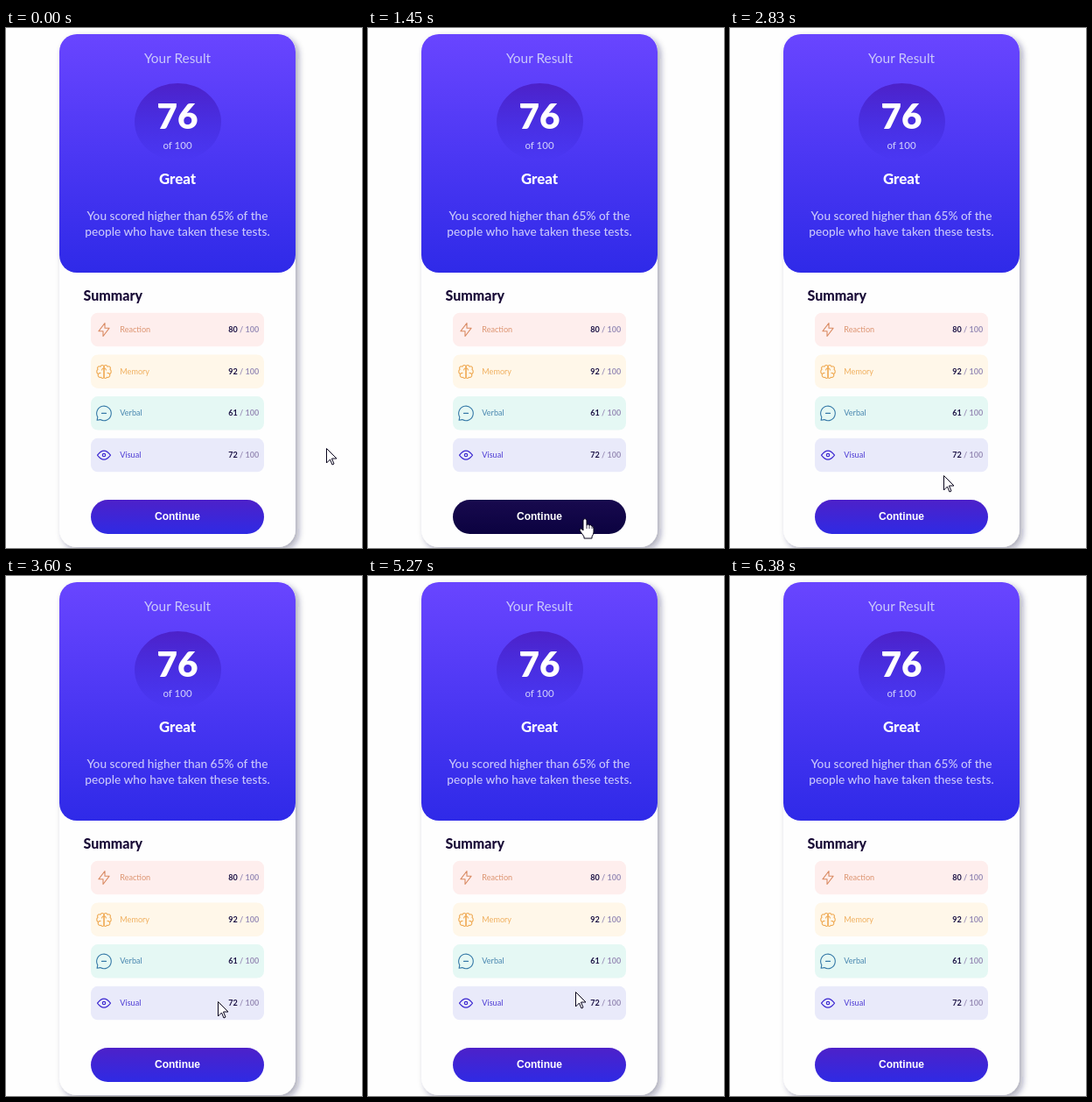
An HTML page that plays this animation: 407x593 px, repeating every 6.87 s.

```html
<!DOCTYPE html>
<html lang="en">
<head>
<meta charset="utf-8">
<title>Result summary</title>
<style>
  html, body { margin: 0; width: 100%; height: 100%; overflow: hidden; background: #fefefe; }
  svg { display: block; width: 407px; height: 593px; }
  text { font-family: Lato, "Open Sans", sans-serif; }
  .mid { text-anchor: middle; }
  .soft { fill: #cac8fb; }
  .medium { font-weight: 500; }
  .bold { font-weight: 700; }
  .heavy { font-weight: 800; }
  .icon { fill: none; stroke-width: 1.1; stroke-linecap: round; stroke-linejoin: round; }
  .pointer { fill: #fff; stroke: #08041c; stroke-linejoin: round; }
</style>
</head>
<body>
<svg viewBox="0 0 407 593">
  <defs>
    <linearGradient id="header" x2="0" y2="1">
      <stop stop-color="#6945ff"/><stop offset="1" stop-color="#2f2ae8"/>
    </linearGradient>
    <linearGradient id="disc" x2="0" y2="1">
      <stop stop-color="#4d21c9"/><stop offset="1" stop-color="#2f22d0" stop-opacity="0"/>
    </linearGradient>
    <linearGradient id="idle" x2="0" y2="1">
      <stop stop-color="#4d21c9"/><stop offset="1" stop-color="#2f2ae4"/>
    </linearGradient>
    <linearGradient id="hover" x2="0" y2="1">
      <stop stop-color="#180a4e"/><stop offset="1" stop-color="#0b0240"/>
    </linearGradient>
    <filter id="shadow" x="-10%" y="-10%" width="120%" height="120%">
      <feDropShadow dx="3.5" dy="3.5" stdDeviation="3.5" flood-color="#1c1a48" flood-opacity=".37"/>
    </filter>
  </defs>

  <rect x="61" y="7" width="270" height="585" rx="20" fill="#fefefe" filter="url(#shadow)"/>
  <rect x="61" y="7" width="270" height="272" rx="20" fill="url(#header)"/>
  <text class="mid soft" x="196" y="40" font-size="15.4">Your Result</text>
  <ellipse cx="196.5" cy="107" rx="49.5" ry="44" fill="url(#disc)"/>
  <text class="mid" x="196" y="114.5" font-size="40.5" font-weight="900" fill="#fff">76</text>
  <text class="mid soft medium" x="196" y="138" font-size="11.5">of 100</text>
  <text class="mid heavy" x="196" y="178" font-size="16.9" fill="#fff">Great</text>
  <text class="mid soft medium" x="196" y="219" font-size="13.7">You scored higher than 65% of the</text>
  <text class="mid soft medium" x="196" y="237" font-size="13.7">people who have taken these tests.</text>

  <text class="heavy" x="88.5" y="311" font-size="16" fill="#180a36">Summary</text>
  <g id="rows"></g>

  <rect id="button" x="97" y="538" width="198" height="39" rx="19.5"/>
  <text class="mid bold" x="196" y="561" font-size="12" fill="#fff"
    style="font-family: 'Liberation Sans', Arial, sans-serif">Continue</text>

  <g id="cursor">
    <path id="arrow" class="pointer" d="M.5 .5V17L4.5 13 7 19 9 18 6.5 12H12Z"/>
    <g id="hand">
      <path class="pointer" d="M-2 2Q0-1 2 2V8Q4 6 5 8 7 7 8 9 10 9 10 12V16Q10 18 8 21V23H-1V21L-6 14Q-6 11-4 12L-2 14Z"/>
      <path d="M2 8V12M5 8V12M8 9V12" stroke="#08041c" stroke-width=".8"/>
    </g>
  </g>
</svg>
<script>
const LOOP = 6870;
const byId = id => document.getElementById(id);

// Icons are drawn around their own centre.
const brainHalf = "M0-6A2.1 2.1 0 0 0-4-5.4 2.1 2.1 0 0 0-7-2.5 3.3 3.3 0 0 0-6.5 3" +
  "A2.5 2.5 0 0 0-3.3 6.5 1.7 1.7 0 0 0 0 6.5V-6M-6.5 3Q-6 1.7-4 1.7M0-4Q2-4 2.5-1.7";
const icons = {
  bolt: `<path d="M1-1.7V-7.5L-6 1.7H-1V7.5L6-1.7Z"/>`,
  brain: `<path d="${brainHalf}"/><path transform="scale(-1 1)" d="${brainHalf}"/>`,
  bubble: `<path d="M-7.2 4.2A8.3 8.3 0 1 1-4.2 7.2L-7.9 7.9ZM-2.5 0H2.5"/>`,
  eye: `<path d="M-7.5 0Q0-10 7.5 0 0 10-7.5 0Z"/><circle r="1.7"/>`
};

const rows = [
  { label: "Reaction", score: 80, icon: "bolt", fill: "#feeeed", ink: "#d98a62" },
  { label: "Memory", score: 92, icon: "brain", fill: "#fff7e9", ink: "#efa850" },
  { label: "Verbal", score: 61, icon: "bubble", fill: "#e5f8f4", ink: "#377aa8" },
  { label: "Visual", score: 72, icon: "eye", fill: "#e9eafa", ink: "#3a26d0" }
];

byId("rows").innerHTML = rows.map((row, i) => `
  <g transform="translate(97 ${324.7 + i * 47.7})" font-size="9.1">
    <rect width="198" height="38.5" rx="8" fill="${row.fill}"/>
    <g class="icon" transform="translate(15 19.3)" stroke="${row.ink}">${icons[row.icon]}</g>
    <text x="33.3" y="22.4" fill="${row.ink}" opacity=".9">${row.label}</text>
    <text class="bold" x="192.3" y="22.4" text-anchor="end" fill="#9a8fb8"><tspan
      fill="#1d1446">${row.score}</tspan> / 100</text>
  </g>`).join("");

const progress = (t, from, to) => Math.min(1, Math.max(0, (t - from) / (to - from)));
const mix = (a, b, u) => a + (b - a) * u;

// The pointer glides in, leaves the button upwards three times, then glides out.
const LIFT = 88;
const lifts = [[1785, 2945], [3400, 4200], [4440, 5800]];

function pointerAt(t) {
  const enter = progress(t, 410, 900);
  const leave = progress(t, 5840, 6370);
  const lifted = lifts.reduce((sum, [from, to]) =>
    sum + LIFT * Math.sqrt(Math.abs(Math.sin(Math.PI * progress(t, from, to)))), 0);
  const x = mix(250, 237, progress(t, 900, 5270));
  const y = 559 - lifted;
  return {
    x: mix(mix(366, x, enter), 371, leave),
    y: mix(mix(479, y, enter), 594, leave),
    gone: leave === 1
  };
}

const show = (id, on) => byId(id).setAttribute("display", on ? "inline" : "none");

function draw(t) {
  const { x, y, gone } = pointerAt(t);
  const over = x >= 97 && x <= 295 && y >= 538 && y <= 577;
  byId("button").setAttribute("fill", `url(#${over ? "hover" : "idle"})`);
  show("cursor", !gone);
  show("hand", over);
  show("arrow", !over);
  byId("cursor").setAttribute("transform", `translate(${Math.round(x)} ${Math.round(y)})`);
}

const start = performance.now();
function tick() {
  draw((performance.now() - start) % LOOP);
  requestAnimationFrame(tick);
}
tick();
</script>
</body>
</html>
```
